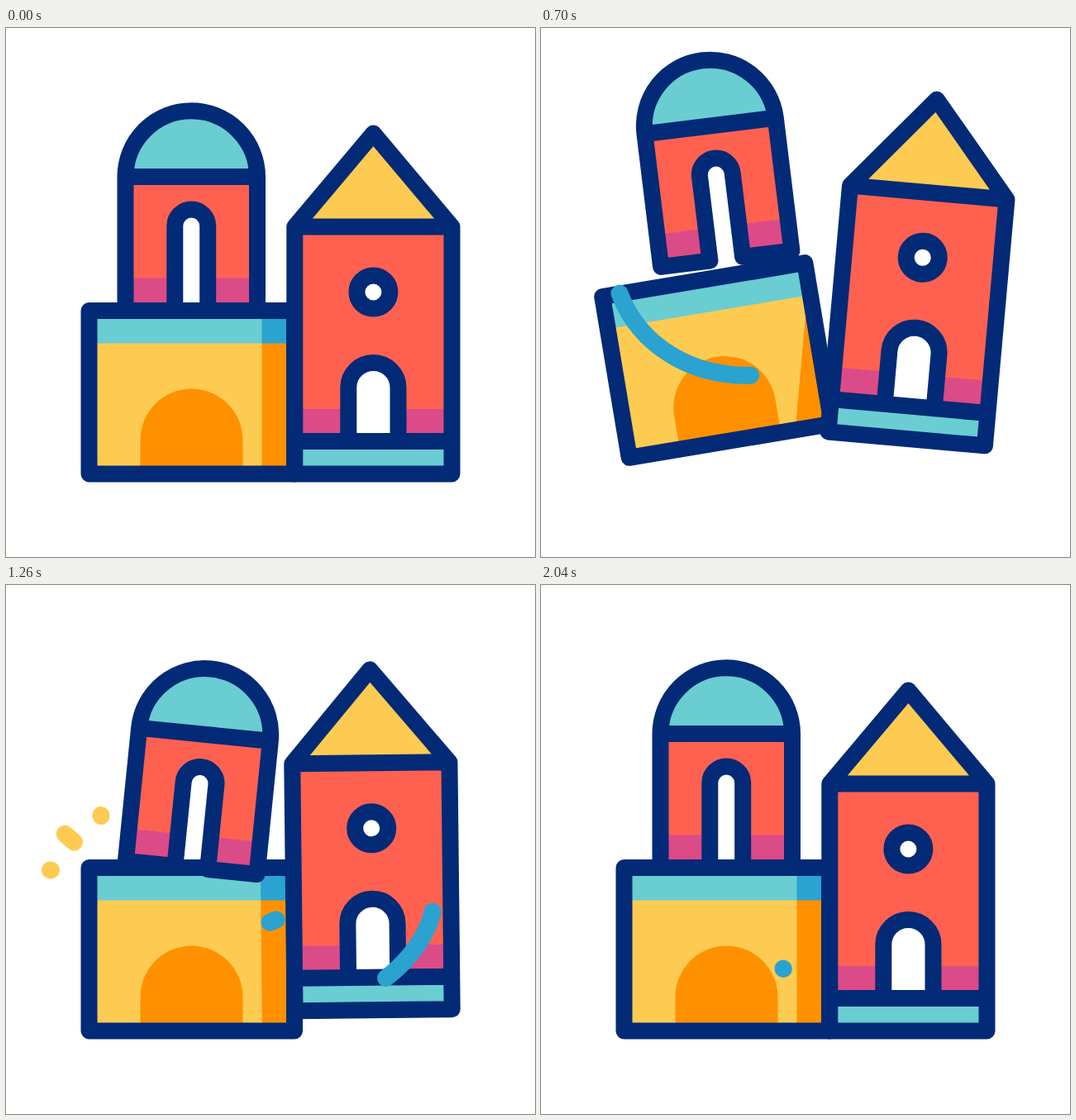
Recreate the animation shown at these times as an HTML page. Size 640x640 px, loop 2.06 s.

```html
<!DOCTYPE html>
<html lang="en">
<head>
<meta charset="utf-8">
<title>Toy castle</title>
<style>
  html, body { margin: 0; width: 100%; height: 100%; overflow: hidden; background: #fff; }
  svg { display: block; width: 100%; height: 100%; }
  .line { fill: none; stroke: #032a76; stroke-width: 20; stroke-linecap: round; stroke-linejoin: round; }
  .trail { fill: none; stroke: #2aa3d0; stroke-width: 21; stroke-linecap: round; visibility: hidden; }
  .spark { stroke: #fdcb51; }
  .red { fill: #ff6151; }
  .pink { fill: #db4b87; }
  .teal { fill: #69cdd2; }
  .yellow { fill: #fdcb51; }
  .orange { fill: #ff9100; }
  .blue { fill: #2aa3d0; }
</style>
</head>
<body>
<svg viewBox="0 0 640 640">
  <defs>
    <clipPath id="shade"><rect class="right" x="309.5" y="200" width="60" height="420"/></clipPath>
  </defs>

  <g class="base">
    <rect class="yellow" x="100.5" y="342" width="248.5" height="197.5"/>
    <rect class="teal" x="100.5" y="342" width="248.5" height="39.5"/>
    <path class="orange" d="M162.5 539V498.5a62 62 0 0 1 124 0V539z"/>
  </g>
  <g clip-path="url(#shade)">
    <g class="base">
      <rect class="orange" x="225" y="381" width="124" height="158.5"/>
      <rect class="blue" x="225" y="342" width="124" height="39.5"/>
    </g>
  </g>
  <g class="base">
    <rect class="line" x="100.5" y="342" width="248.5" height="197.5"/>
  </g>

  <g class="left">
    <path class="teal" d="M144.5 180a79.75 79.75 0 0 1 159.5 0z"/>
    <path class="red" d="M144.5 180H304V303H244.2V239.5a19.95 19.95 0 0 0-39.9 0V303H144.5z"/>
    <path class="pink" d="M144.5 302.5h59.8V342h-59.8zM244.2 302.5H304V342h-59.8z"/>
    <path class="line" d="M144.5 180H304M204.3 342H144.5V180a79.75 79.75 0 0 1 159.5 0V342H244.2V239.5a19.95 19.95 0 0 0-39.9 0z"/>
  </g>

  <g class="right">
    <path class="yellow" d="M349.3 240.5L444.4 127.5L539.5 240.5z"/>
    <rect class="red" x="349.3" y="240.5" width="190.2" height="221"/>
    <rect class="pink" x="349.3" y="461" width="190.2" height="39"/>
    <rect class="teal" x="349.3" y="500" width="190.2" height="39.5"/>
    <path d="M414.3 500V435a30.1 30.1 0 0 1 60.2 0V500z" fill="#fff"/>
    <circle cx="444.4" cy="319.5" r="20" fill="#fff"/>
    <path class="line" d="M349.3 240.5L444.4 127.5L539.5 240.5V539.5H349.3zH539.5M349.3 500H539.5M414.3 500V435a30.1 30.1 0 0 1 60.2 0V500"/>
    <circle class="line" cx="444.4" cy="319.5" r="20"/>
  </g>

  <path class="trail" d="M95 321C128 408 232 443 327 405"/>
  <path class="trail" d="M516 395C503 462 385 562 293 464"/>
  <path class="trail spark" d="M115 279.5L111 251.5"/>
  <path class="trail spark" d="M82.5 311L54 286"/>
  <path class="trail spark" d="M54.5 345L23 342"/>
</svg>
<script>
const LOOP = 2060, STEP = 20;

// Each block turns about its pivot; steps are [ms, value].
const blocks = [
  { name: 'right', pivot: '349 519',
    lift: [[200, 0], [560, -51], [1040, -51], [1465, 0]],
    turn: [[200, 0], [560, 6], [1170, -0.8], [1465, 0]] },
  { name: 'left', pivot: '224.25 342',
    lift: [[310, 0], [680, -63], [1260, 0]],
    turn: [[310, 0], [680, -7], [1260, 5.75], [1560, 0]] },
  { name: 'base', pivot: '225 512',
    lift: [[390, 0], [750, -42], [1160, 0]],
    turn: [[390, 0], [750, -10], [1160, 0]] }
];

// Start and end of the head and of the tail of each stroke, in ms.
const trails = [
  { head: [440, 985], tail: [915, 1335] },
  { head: [1153, 1703], tail: [1623, 2050] },
  { head: [1255, 1525], tail: [1350, 1610] },
  { head: [1200, 1470], tail: [1300, 1610] },
  { head: [1255, 1525], tail: [1350, 1610] }
];

const smooth = p => p * p * (3 - 2 * p);
const easeOut = p => 1 - (1 - p) ** 2;

function valueAt(steps, t) {
  if (t <= steps[0][0]) return steps[0][1];
  for (let i = 1; i < steps.length; i++) {
    const [t0, v0] = steps[i - 1], [t1, v1] = steps[i];
    if (t < t1) return v0 + (v1 - v0) * smooth((t - t0) / (t1 - t0));
  }
  return steps[steps.length - 1][1];
}

function reach([from, to], t) {
  return 100 * easeOut(Math.min(1, Math.max(0, (t - from) / (to - from))));
}

for (const b of blocks) b.nodes = document.querySelectorAll('.' + b.name);
document.querySelectorAll('.trail').forEach((node, i) => {
  node.setAttribute('pathLength', 100);
  trails[i].node = node;
});

function draw(t) {
  for (const b of blocks) {
    const pose = `translate(0 ${valueAt(b.lift, t)}) rotate(${valueAt(b.turn, t)} ${b.pivot})`;
    b.nodes.forEach(n => n.setAttribute('transform', pose));
  }
  for (const { node, head, tail } of trails) {
    const shown = t > head[0] && t < tail[1];
    node.style.visibility = shown ? 'visible' : 'hidden';
    if (!shown) continue;
    const start = Math.min(reach(tail, t), 99.8);
    const length = Math.max(reach(head, t) - start, 0.1);
    node.style.strokeDasharray = `0 ${start} ${length} 300`;
    // The leading zero dash would leave a dot at the path start, so shift past it.
    node.style.strokeDasharray = `${length} 300`;
    node.style.strokeDashoffset = -start;
  }
}

const begin = performance.now();
function tick() {
  const t = (performance.now() - begin) % LOOP;
  draw(Math.floor(t / STEP) * STEP);
  requestAnimationFrame(tick);
}
draw(0);
requestAnimationFrame(tick);
</script>
</body>
</html>
```
